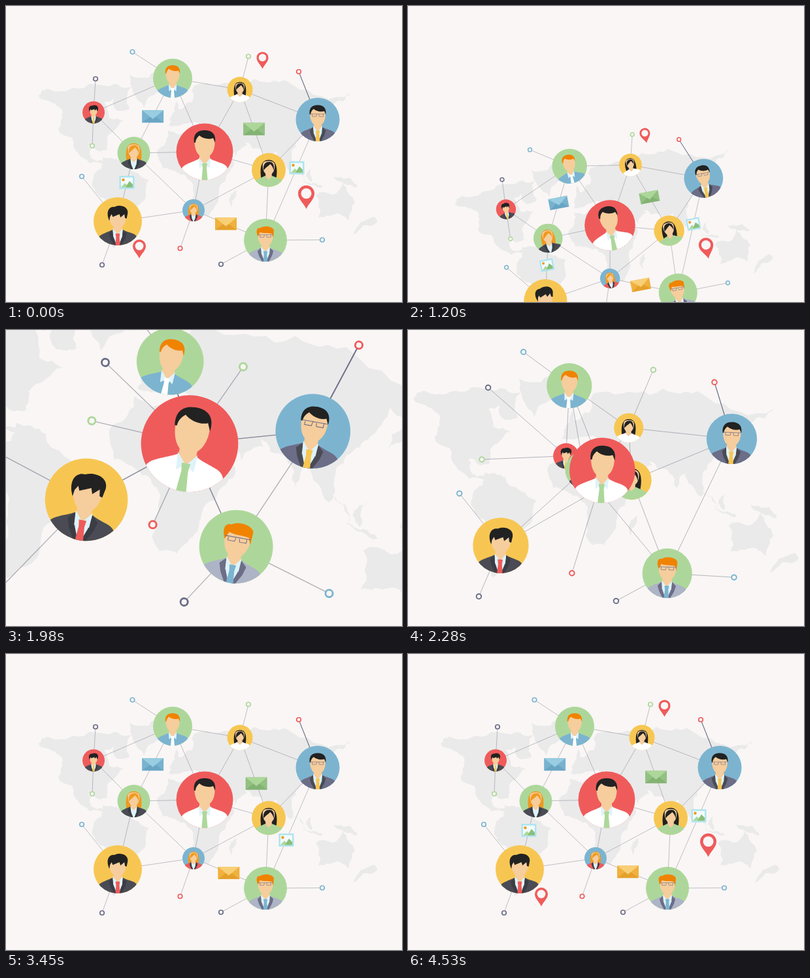
Write an HTML page with a canvas that moves like this. It is 606x455 px and loops after 4560 ms.

```html
<!DOCTYPE html>
<html lang="en">
<head>
<meta charset="utf-8">
<title>Global network</title>
<style>
  html, body { margin: 0; width: 100%; height: 100%; overflow: hidden; background: #f9f6f5; }
  canvas { display: block; width: 606px; height: 455px; }
</style>
</head>
<body>
<canvas width="606" height="455"></canvas>
<script>
const ctx = document.querySelector('canvas').getContext('2d');
const LOOP = 4560, CUT = 1500, CX = 304, CY = 224;
const PAPER = '#f9f6f5', RED = '#ef5b5b', GREEN = '#add79a', YELLOW = '#f7c652', BLUE = '#7cb4d0', PURPLE = '#6c6d87',
  DARK = '#4a4b54', BLACK = '#222', SKIN = '#f6cd9c', ICE = '#def3fa', ORANGE = '#f08300', AMBER = '#ee9a20';

// Each coast is a few corners, broken up by random midpoint shifts
const COASTS = {
  northAmerica: '50,138 64,127 105,126 165,120 192,124 189,158 172,162 164,142 150,148 158,172 180,177 154,203 155,220 126,215 129,229 152,241 110,226 80,188 82,156',
  greenland: '189,106 246,102 240,132 211,156',
  southAmerica: '148,233 176,238 219,268 210,300 188,326 165,372 152,350 150,295 134,262',
  africa: '248,191 283,190 319,203 333,238 348,238 335,270 325,300 310,324 295,324 282,268 262,256 240,250 233,220',
  eurasia: '250,184 251,172 270,158 284,148 284,130 308,119 380,112 440,122 528,133 497,153 494,168 470,152 466,185 455,200 437,222 436,254 415,222 404,246 392,222 364,207 370,215 352,231 327,193 305,193 290,178 266,184',
  britain: '255,165 260,146 267,165',
  madagascar: '352,283 352,292 344,309 341,298',
  australia: '474,291 515,273 534,302 525,329 503,320 478,326',
  newZealand: '563,324 568,332 531,352',
  newGuinea: '501,260 526,264 537,279',
  sumatra: '436,244 448,253 457,270',
  borneo: '459,262 473,246 467,271',
  java: '454,270 470,272 485,278',
  japan: '479,196 489,176 492,186'
};
const land = new Path2D();
let seed = 7;
const random = () => (seed = seed * 16807 % 2147483647) / 2147483647;
function coast(a, b, depth) {
  if (!depth) return land.lineTo(...b);
  const bend = (random() - .5) * .4, dx = b[0] - a[0], dy = b[1] - a[1];
  const mid = [a[0] + dx / 2 - dy * bend, a[1] + dy / 2 + dx * bend];
  coast(a, mid, depth - 1);
  coast(mid, b, depth - 1);
}
for (const text of Object.values(COASTS)) {
  const pts = text.split(' ').map(p => p.split(',').map(Number));
  land.moveTo(...pts[0]);
  pts.forEach((p, i) => coast(p, pts[(i + 1) % pts.length], 3));
  land.closePath();
}

// Large people leave the centre first, small ones later; reach is how long their dots fly
const person = (x, y, r, bg, look) => ({ x, y, r, bg, dy: 4, start: r > 28 ? 1745 : 2172, dur: r > 28 ? 620 : 700, ...look });
const nodes = {
  red: person(134, 163.5, 17, RED, { hair: BLACK, cut: 'messy', top: DARK, suit: 1, tie: YELLOW }),
  girl: person(195.5, 226, 25, GREEN, { hair: AMBER, cut: 'long', top: DARK, suit: 1, start: 2198 }),
  bob: person(402, 252, 26, YELLOW, { hair: BLACK, cut: 'long', top: GREEN, start: 2121 }),
  low: person(287, 314, 17, BLUE, { hair: AMBER, cut: 'long', top: RED, suit: 1 }),
  high: person(358, 128.5, 19.5, YELLOW, { hair: BLACK, cut: 'long', top: '#fff', start: 2020 }),
  top: person(255, 111, 30, GREEN, { hair: ORANGE, cut: 'short', top: BLUE, tie: '#fff', reach: 640 }),
  boss: person(171, 331, 37, YELLOW, { hair: BLACK, cut: 'messy', top: DARK, suit: 1, tie: RED, reach: 550 }),
  ginger: person(397, 360, 33, GREEN, { hair: ORANGE, cut: 'block', top: '#adb4c6', suit: 1, lapel: PURPLE, tie: BLUE, glasses: 1, reach: 705 }),
  blue: person(477, 174.5, 33.5, BLUE, { hair: BLACK, cut: 'short', top: PURPLE, suit: 1, lapel: DARK, tie: YELLOW, glasses: 1, reach: 565 }),
  main: { x: CX, y: CY, r: 43.5, dy: 0, bg: RED, hair: BLACK, cut: 'short', top: '#fff', tie: GREEN }
};
const links = ('top-red top-high top-main top-girl high-main high-blue high-bob blue-bob blue-ginger main-girl ' +
  'main-bob main-low bob-low bob-ginger girl-red girl-boss girl-low boss-low low-ginger')
  .split(' ').map(s => s.split('-').map(k => nodes[k]));
const dot = (x, y, color, to) => {
  const { reach } = nodes[to];
  return { x, y, color, to: nodes[to], start: reach ? 1530 + .07 * reach : 1765, dur: reach || 700 };
};
const dots = [
  dot(193.5, 70.5, BLUE, 'top'), dot(371, 77.5, GREEN, 'high'), dot(448, 101, RED, 'blue'),
  dot(137, 112, PURPLE, 'red'), dot(132, 215, GREEN, 'red'), dot(116, 262, BLUE, 'boss'),
  dot(147, 398, PURPLE, 'boss'), dot(266.5, 372.5, RED, 'low'),
  dot(329, 397, PURPLE, 'ginger'), dot(484, 359.5, BLUE, 'ginger')
];
// Items slide along a link and stop part of the way
const item = (from, to, stop, start, ...colors) => ({ from: nodes[from], to: nodes[to], stop, start, colors });
const items = [
  item('girl', 'top', .49, 2800, '#78b2cf', '#98cde2', '#69a5c3'),
  item('bob', 'high', .51, 3090, '#92c181', '#add79a', '#83b273'),
  item('ginger', 'low', .55, 3012, '#f0b13e', '#f9cf76', '#e5a02c'),
  item('ginger', 'blue', .6, 3198),
  item('boss', 'girl', .57, 3480)
];
const pins = [[459.5, 312, 12.5, 3700], [204, 388, 10, 3880], [392.5, 96.5, 9, 4050]];

const HAIR = {
  short: 'M-16-14C-18-28-10-33 0-33C10-33 18-28 16-14L13-21C6-18-4-21-8-25C-12-22-14-18-14-14Z',
  messy: 'M-17-10C-21-24-14-31-6-30C4-35 19-31 18-19L16-9L13-10L12-17L5-11L3-17L-9-12L-11-17L-14-12L-15-5Z',
  block: 'M-15-11C-20-22-18-30-10-29C-2-35 16-32 17-24L16-9L13-17C4-19-4-17-11-20Z',
  long: 'M-13-3C-15-18-9-25 2-25C12-25 15-15 13-2C12-9 9-14 4-19C-2-13-8-10-13-3Z'
};

const clamp = u => Math.min(1, Math.max(0, u));
const easeOut = u => 1 - (1 - clamp(u)) ** 2;
const backOut = u => { const v = clamp(u) - 1; return 1 + 4.2 * v ** 3 + 3.2 * v ** 2; };
const mix = (a, b, f) => ({ x: a.x + (b.x - a.x) * f, y: a.y + (b.y - a.y) * f });
const flight = (o, t) => o.start ? easeOut((t - o.start) / o.dur) : 1;
const place = (o, t) => mix(nodes.main, o, flight(o, t));

const fill = (color, path) => { ctx.fillStyle = color; ctx.fill(new Path2D(path)); };
const rect = (color, ...box) => { ctx.fillStyle = color; ctx.fillRect(...box); };
function circle(x, y, r, color) {
  ctx.beginPath();
  ctx.arc(x, y, r, 0, 7);
  ctx.fillStyle = color;
  ctx.fill();
}
function at({ x, y }, scale, draw) {
  ctx.save();
  ctx.translate(x, y);
  ctx.scale(scale, scale);
  draw();
  ctx.restore();
}
function line(a, b, color = 'rgba(108,110,130,.52)', width = .8) {
  ctx.beginPath();
  ctx.moveTo(a.x, a.y);
  ctx.lineTo(b.x, b.y);
  ctx.strokeStyle = color;
  ctx.lineWidth = width;
  ctx.stroke();
}

function drawPerson(n, pos, grow = 1) {
  const woman = n.cut === 'long';
  at(pos, n.r / 43.5 * grow, () => {
    circle(0, 0, 43.5, n.bg);
    ctx.clip();
    ctx.translate(0, n.dy);
    if (woman) fill(n.hair, 'M-19 20C-24-10-19-30 0-30C19-30 24-10 19 20Q0 24-19 20Z');
    fill(n.top, 'M-46 55L-35 27C-35 20-18 16-9 11L0 20L9 11C18 16 28 17 32 21C35 24 35 26 35 28L46 55Z');
    if (n.suit) {
      fill(n.lapel || '#3c3d44', 'M-9 11L-16 18L-13 28L-3 46H3L13 28L16 18L9 11Z');
      fill(ICE, 'M-9 11L-7 26L0 44L7 26L9 11Z');
    }
    fill(SKIN, 'M-8-2H8V13L0 21L-8 13Z');
    if (!woman) fill(ICE, 'M-9 9L-8 25L0 19L8 25L9 9L0 20Z');
    if (n.tie) fill(n.tie, 'M-4 18H4L3 25L5 48H-5L-3 25Z');
    fill(SKIN, 'M-15.5-18C-15-25-8-27 0-27C8-27 15-25 15.5-16C16 0 8 9 0 9C-8 9-16 0-15.5-18Z');
    fill(n.hair, HAIR[n.cut]);
    if (n.glasses) {
      ctx.strokeStyle = PURPLE;
      ctx.stroke(new Path2D('M-15-15H15M-11-15V-10H-3L-2-15M11-15V-10H3L2-15'));
    }
  });
}

function drawItem([base, flap, fold], pos) {
  at(pos, 1, () => {
    if (base) {
      rect(base, -16.5, -9.5, 33, 19);
      fill(fold, 'M-16.5 9.5L-4 0H4L16.5 9.5Z');
      fill(flap, 'M-16.5-9.5H16.5L0 4Z');
    } else {
      rect('#aee4ef', -11.5, -10, 23, 20);
      rect('#f2fbfd', -9, -7.5, 18, 15);
      circle(-5.5, -4, 2.2, AMBER);
      fill(GREEN, 'M-9 7.5L-3 1L0 4L4-2L9 3V7.5Z');
      fill('#8abf7c', 'M-2 7.5L4-2L9 3V7.5Z');
    }
  });
}

// Growing holes on a slanted lattice uncover the land
function drawMap(t) {
  ctx.save();
  if (t < 2150) {
    const holes = new Path2D();
    for (let i = -8; i <= 8; i++) for (let j = -4; j <= 4; j++) {
      const x = 299 + 76 * i + 36 * j, y = 233.5 - 7 * i + 61 * j;
      const r = Math.max(0, .18 * (t - CUT) - 3 * Math.abs(j));
      holes.moveTo(x + r, y);
      holes.arc(x, y, r, 0, 7);
    }
    ctx.clip(holes);
  }
  ctx.fillStyle = '#eaeaea';
  ctx.fill(land);
  ctx.restore();
}

// Leaving: drop and tilt away. Entering: fall in from above, turned and enlarged.
function camera(t) {
  if (t < CUT) {
    const p = Math.max(0, (t - 570) / 1000) ** 3;
    return [CX + 20 * p, CY + 450 * p, 1 - .43 * p, -43 * p];
  }
  const p = Math.max(0, (2734 - t) / 1114) ** 3;
  return [CX - 106 * p + 102 * p * p, CY - 111 * p - 158 * p * p, 1 + 2.3 * p, 33 * p];
}

function render(clock) {
  const t = clock < CUT ? clock + LOOP : clock;
  const [x, y, scale, turn] = camera(clock);
  rect(PAPER, 0, 0, 606, 455);
  at({ x, y }, scale, () => {
    ctx.rotate(turn * Math.PI / 180);
    ctx.translate(-CX, -CY);
    drawMap(t);
    for (const [a, b] of links) line(place(a, t), place(b, t));
    for (const d of dots) line(place(d, t), place(d.to, t), ...(d.to === nodes.blue ? [PURPLE, 1.1] : []));
    for (const it of items) {
      const f = easeOut((t - it.start) / 600);
      if (f) drawItem(it.colors, mix(it.from, it.to, it.stop * f));
    }
    for (const d of dots) {
      if (!flight(d, t)) continue;
      const p = place(d, t);
      circle(p.x, p.y, 4.1, d.color);
      circle(p.x, p.y, 2.4, PAPER);
    }
    for (const n of Object.values(nodes)) {
      const grow = n === nodes.main ? easeOut((t - 1530) / 225) : 1;
      if (flight(n, t) && grow) drawPerson(n, place(n, t), grow);
    }
    const hop = clock < 540 ? 3 * Math.sin(Math.PI * clock / 540) : 0;
    for (const [x, y, r, start] of pins) {
      const grow = backOut((t - start) / 450);
      if (t > start && grow > 0) at({ x, y: y - hop }, r * grow, () => {
        fill(RED, 'M0 0C-.3-.7-1-1.2-1-1.9A1 1 0 0 1 1-1.9C1-1.2 .3-.7 0 0Z');
        circle(0, -1.9, .64, PAPER);
      });
    }
  });
}

const begin = performance.now();
(function frame() {
  render((performance.now() - begin) % LOOP);
  requestAnimationFrame(frame);
})();
</script>
</body>
</html>
```
